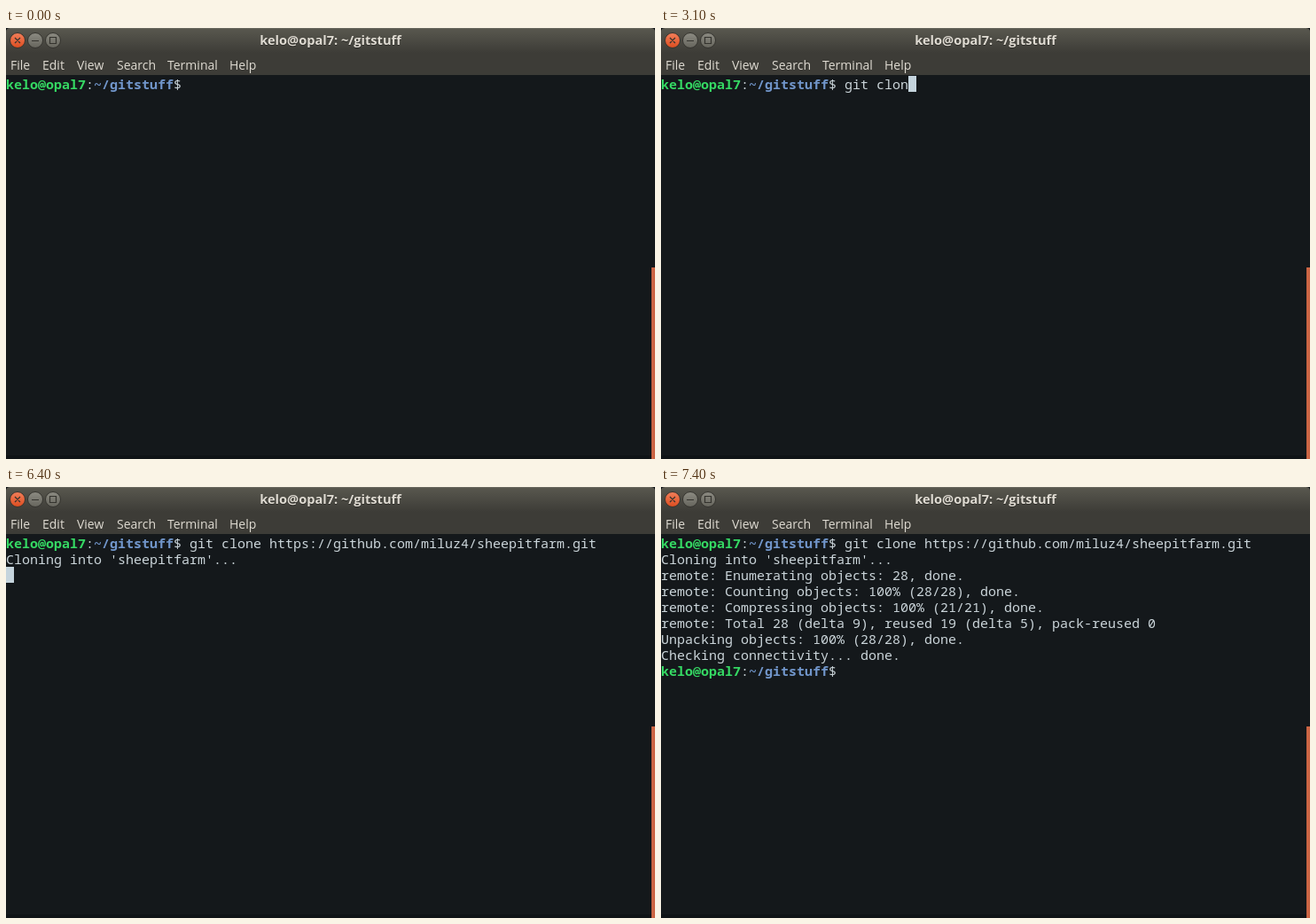
Animation, 732 px wide and 486 px high, one loop 8000 ms. Source, as an HTML page:

```html
<!DOCTYPE html>
<html lang="en">
<head>
<meta charset="utf-8">
<title>Terminal</title>
<style>
  html, body { margin: 0; width: 100%; height: 100%; overflow: hidden; background: #14181b; }
  svg { display: block; width: 732px; height: 486px; }
  text { white-space: pre; }
  .ui { font: 14px "Open Sans", "Noto Sans", sans-serif; fill: #dfdbd2; }
  .title { font-weight: 700; font-size: 14.6px; text-anchor: middle; }
  #screen { font: 15px "Noto Sans Mono", "DejaVu Sans Mono", monospace; fill: #cbd5da; }
  #screen .host { font-weight: 700; fill: #35d863; }
  #screen .path { font-weight: 700; fill: #7196cb; }
  #screen .cursor { fill: #c5d4dd; }
  #screen .under { fill: #14181b; }
</style>
</head>
<body>
<svg viewBox="0 0 732 486">
  <defs>
    <linearGradient id="bar" x2="0" y2="1">
      <stop stop-color="#59584f"/><stop offset="1" stop-color="#3d3c37"/>
    </linearGradient>
    <linearGradient id="close" x2="0" y2="1">
      <stop stop-color="#f37f5a"/><stop offset="1" stop-color="#dc4d20"/>
    </linearGradient>
    <linearGradient id="grey" x2="0" y2="1">
      <stop stop-color="#8c8b82"/><stop offset="1" stop-color="#66655d"/>
    </linearGradient>
  </defs>
  <rect width="732" height="486" fill="#14181b"/>
  <path d="M0 53V5Q0 0 5 0H727Q732 0 732 5V53Z" fill="#3d3c37"/>
  <path d="M0 28V5Q0 0 5 0H727Q732 0 732 5V28Z" fill="url(#bar)"/>
  <path d="M4 .5H728" stroke="#68675d"/>
  <g stroke="#34332e">
    <circle cx="13" cy="14" r="8.5" fill="url(#close)"/>
    <circle cx="33" cy="14" r="8.5" fill="url(#grey)"/>
    <circle cx="53" cy="14" r="8.5" fill="url(#grey)"/>
    <path d="M10 11l6 6M16 11l-6 6M29 14.5h8M49.5 10.5h7v7h-7z" fill="none" stroke-width="1.2"/>
  </g>
  <text class="ui title" x="366" y="20" style="fill:#2b2a26">kelo@opal7: ~/gitstuff</text>
  <text class="ui title" x="366" y="19">kelo@opal7: ~/gitstuff</text>
  <g class="ui">
    <text x="5" y="47">File</text>
    <text x="41" y="47">Edit</text>
    <text x="80" y="47">View</text>
    <text x="125" y="47">Search</text>
    <text x="182" y="47">Terminal</text>
    <text x="252" y="47">Help</text>
  </g>
  <rect y="482" width="728" height="4" fill="#0f1316"/>
  <rect x="728" y="270" width="4" height="216" fill="#cb6544"/>
  <g id="screen"></g>
</svg>
<script>
const LOOP = 8000, CELL = 9, ROW = 18, TOP = 54, PROMPT_COLS = 23;
const screen = document.getElementById('screen');
const command = 'git clone https://github.com/miluz4/sheepitfarm.git';

// [time, characters typed]; the address is pasted in one go
const typing = [[0, 0], [1900, 1], [2200, 2], [2400, 3], [2500, 4], [2800, 6],
  [3100, 8], [3300, 9], [3500, 10], [4200, command.length]];
const cursorOn = [[500, 1100], [1700, 4500], [5200, 5700], [6300, 7000]];
const unpacked = [[6800, 10], [7000, 14], [7100, 17], [7300, 22], [7400, 28]];

const valueAt = (steps, t) => steps.filter(([start]) => start <= t).pop()[1];

function unpackLine(t) {
  const count = valueAt(unpacked, t);
  const percent = String(Math.floor(count / 28 * 100)).padStart(3);
  return `Unpacking objects: ${percent}% (${count}/28)${count === 28 ? ', done.' : ''}`;
}

function outputAt(t) {
  const lines = [];
  if (t >= 6400) lines.push("Cloning into 'sheepitfarm'...");
  if (t >= 6800) lines.push(
    'remote: Enumerating objects: 28, done.',
    'remote: Counting objects: 100% (28/28), done.',
    'remote: Compressing objects: 100% (21/21), done.');
  if (t >= 7300) lines.push('remote: Total 28 (delta 9), reused 19 (delta 5), pack-reused 0');
  if (t >= 6800) lines.push(unpackLine(t));
  if (t >= 7400) lines.push('Checking connectivity... done.');
  return lines;
}

const put = (row, col, text, style = '') =>
  `<text class="${style}" x="${col * CELL}" y="${TOP + row * ROW + 15}">${text}</text>`;

const prompt = (row, text) => put(row, 0, 'kelo@opal7', 'host') + put(row, 10, ':') +
  put(row, 11, '~/gitstuff', 'path') + put(row, 21, '$ ' + text);

function cursor(row, col, covered = '') {
  return `<rect class="cursor" x="${col * CELL}" y="${TOP + row * ROW}" width="${CELL}" height="${ROW}"/>` +
    put(row, col, covered, 'under');
}

function render(t) {
  const typed = valueAt(typing, t), lines = outputAt(t);
  let markup = prompt(0, command.slice(0, typed));
  lines.forEach((line, i) => markup += put(i + 1, 0, line));
  if (t >= 7400) markup += prompt(lines.length + 1, '');
  if (cursorOn.some(([from, to]) => t >= from && t < to)) {
    if (t < 6400) markup += cursor(0, PROMPT_COLS + typed);
    else if (t < 6800) markup += cursor(2, 0);
    else markup += cursor(lines.length, 0, 'U');
  }
  return markup;
}

let shown = '';
function frame() {
  const markup = render(performance.now() % LOOP);
  if (markup !== shown) screen.innerHTML = shown = markup;
  requestAnimationFrame(frame);
}
frame();
</script>
</body>
</html>
```
